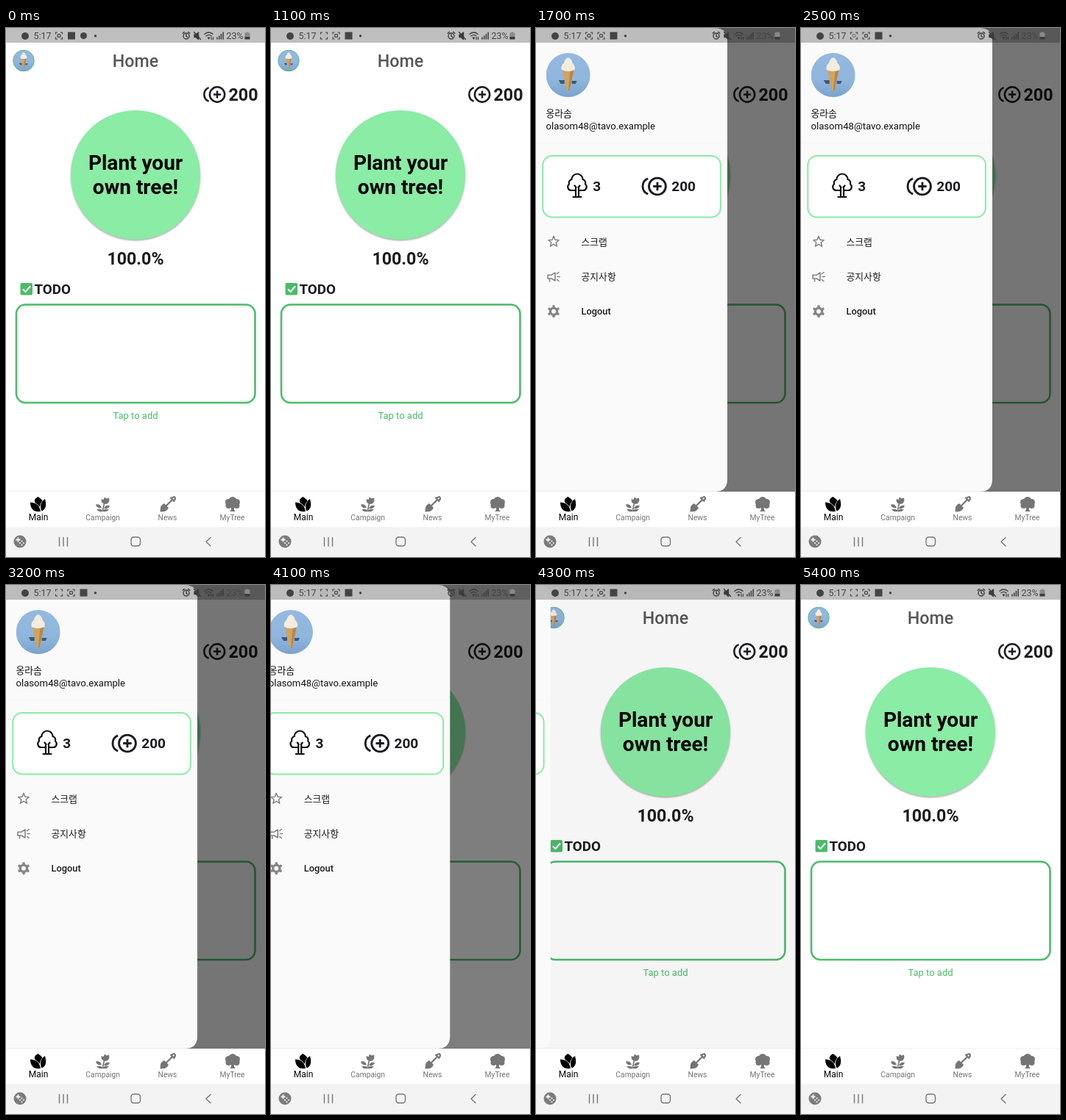
An HTML page that plays this animation: 352x720 px, repeating every 5500 ms.

```html
<!DOCTYPE html>
<html lang="en">
<head>
<meta charset="utf-8">
<title>Plant your own tree</title>
<style>
  html, body { margin: 0; width: 100%; height: 100%; overflow: hidden; background: #fff; }
  svg { display: block; width: 352px; height: 720px; }
  text { font-family: Roboto, "Noto Sans CJK KR", "Noto Sans CJK", sans-serif; }
  .mid { text-anchor: middle; }
  .bold { font-weight: 700; fill: #1c1b1f; }
  .item { font-size: 12.84px; font-weight: 500; fill: #1c1b1f; }
  .tab { font-size: 10.3px; fill: #757575; text-anchor: middle; }
  .line { fill: none; stroke-linecap: round; stroke-linejoin: round; }
</style>
</head>
<body>
<svg viewBox="0 0 352 720">
  <defs>
    <clipPath id="round"><circle r="30"/></clipPath>
    <linearGradient id="sky" x2="0" y2="1">
      <stop stop-color="#94b9e2"/><stop offset=".6" stop-color="#8fb6dc"/><stop offset="1" stop-color="#7ba3cf"/>
    </linearGradient>
    <filter id="soft" x="-10%" y="-10%" width="120%" height="120%"><feGaussianBlur stdDeviation="1.3"/></filter>
    <g id="photo" clip-path="url(#round)">
      <rect x="-30" y="-30" width="60" height="60" fill="url(#sky)"/>
      <path d="M-13 7h8v5h-5zM5 8h7l-2 4h-5z" fill="#3d5878"/>
      <path d="M-8 -8H8L1.500 22H-1.500z" fill="#d3a35b"/>
      <path d="M3 -8H8L1.500 22H0z" fill="#b98643"/>
      <path d="M-9 -7Q-10 -14 -6 -16Q-4 -23 0 -24Q5 -22 6 -16Q10 -13 9 -7Q0 -3 -9 -7z" fill="#f3ecdf"/>
    </g>
    <!-- 24-unit coin, origin at the left middle -->
    <g id="coin" class="line" stroke="#1c1b1f" stroke-width="2" style="stroke-linecap:butt">
      <circle cx="15" r="8"/>
      <path d="M15 -4V4M11 0H19M6 -7.400A8 8 0 0 0 6 7.400"/>
    </g>
    <path id="corners" class="line" stroke="#444" stroke-width="1.200" style="stroke-linecap:butt"
      d="M-4.500 -2V-4.500H-2M2 -4.500H4.500V-2M4.500 2V4.500H2M-2 4.500H-4.500V2"/>
    <rect id="core" x="-1.900" y="-1.900" width="3.800" height="3.800" rx="1" fill="none" stroke="#444" stroke-width="1.200"/>
  </defs>

  <rect width="352" height="720" fill="#fff"/>

  <g id="home">
    <use href="#photo" transform="translate(24 44.500) scale(.48)"/>
    <circle cx="24" cy="44.500" r="14.300" fill="none" stroke="#5fb98a" stroke-width="1"/>
    <text class="mid" x="176" y="53" font-size="23.200" font-weight="500" fill="#565656">Home</text>
    <use href="#coin" transform="translate(268 90.500) scale(1.270)"/>
    <text class="bold" x="302.500" y="99" font-size="23.300">200</text>
    <circle cx="176" cy="201.500" r="88" fill="#000" opacity=".32" filter="url(#soft)"/>
    <circle cx="176" cy="200" r="88" fill="#8aeca5"/>
    <g class="mid" font-size="28" font-weight="700" fill="#000">
      <text x="176" y="193">Plant your</text>
      <text x="176" y="226">own tree!</text>
    </g>
    <text class="bold mid" x="176" y="322.300" font-size="23.200">100.0%</text>
    <rect x="19.500" y="347" width="16.500" height="16.500" rx="2" fill="#4cbb6b"/>
    <path d="M23 355.500L26.500 359L33 351.500" fill="none" stroke="#fff" stroke-width="2"/>
    <text class="bold" x="38.500" y="361.800" font-size="18.800">TODO</text>
    <rect x="14" y="376.500" width="324.500" height="133.500" rx="12.500" fill="none" stroke="#4cbb6b" stroke-width="2.600"/>
    <text class="mid" x="176" y="531.700" font-size="13" fill="#4cbb6b">Tap to add</text>
  </g>

  <rect id="scrim" width="352" height="631" opacity="0"/>

  <g id="drawer" transform="translate(-262 0)">
    <path d="M0 0H243Q260 0 260 17V614Q260 631 243 631H0z" fill="#fafafa"/>
    <use href="#photo" transform="translate(43.700 64)"/>
    <text x="13.500" y="121.300" font-size="12.840" fill="#111">옹라솜</text>
    <text x="13.500" y="137.500" font-size="13.150" fill="#111">olasom48@tavo.example</text>
    <path d="M0 156.500H260" stroke="#f3f3f3"/>
    <rect x="9.300" y="174" width="241.500" height="83.500" rx="12.500" fill="#fff" stroke="#8aeca5" stroke-width="2"/>
    <g class="line" stroke="#111" stroke-width="2.200">
      <path d="M53 221H48A4.800 4.800 0 0 1 45 212.500A5 5 0 0 1 48.500 206A7.500 7.500 0 0 1 63.500 206A5 5 0 0 1 67 212.500A4.800 4.800 0 0 1 64 221H59"/>
      <path d="M54 218V229.500M58 218V229.500M50.500 230H61.500M52.500 214.500L54.500 217M59.500 214.500L57.500 217"/>
    </g>
    <text class="bold" x="77.300" y="222" font-size="19">3</text>
    <use href="#coin" transform="translate(143.500 215.500) scale(1.430)"/>
    <text class="bold" x="184.300" y="222" font-size="19">200</text>
    <path id="star" class="line" stroke="#858585" stroke-width="1.500"/>
    <text class="item" x="61.500" y="295.800">스크랩</text>
    <g class="line" stroke="#858585" stroke-width="1.600">
      <path d="M16 336.200H21L26 333V344L21 341H16zM18.500 341V345M29 338.500H32.300M28.500 334.500L31 332.500M28.500 342.500L31 344.500"/>
    </g>
    <text class="item" x="61.500" y="343.300">공지사항</text>
    <path id="gear" fill="#858585" fill-rule="evenodd"/>
    <text class="item" x="61.500" y="390">Logout</text>
  </g>

  <g id="status">
    <rect width="352" height="20" opacity=".25"/>
    <circle cx="26" cy="11" r="5" fill="#444"/>
    <g font-size="12.500" fill="#444">
      <text x="37.500" y="15.200">5:17</text>
      <text x="299.500" y="15.200">23%</text>
    </g>
    <g id="fresh" transform="translate(72 10.500)"><use href="#corners"/><use href="#core" id="pulse"/></g>
    <g id="row">
      <g transform="translate(72 10.500)"><use href="#corners"/><use href="#core"/></g>
      <rect x="84" y="5.500" width="10" height="10" fill="#444"/>
      <circle id="last" cx="105.500" cy="10.500" r="4.500" fill="#444"/>
    </g>
    <circle cx="121.500" cy="10.700" r="1.700" fill="#444"/>
    <g class="line" stroke="#3c3c3c" stroke-width="1.400">
      <circle cx="245" cy="11" r="4"/>
      <path d="M245 8.800V11.300L246.700 12.300M240.200 7.200L242.300 5.400M249.800 7.200L247.700 5.400"/>
      <path d="M256 9H258L261.500 6V15.500L258 12.500H256z" fill="#3c3c3c"/>
      <path d="M255.500 5.500L264.500 15.500"/>
      <path d="M270 8.200Q275.500 3.800 281 8.200M272 10.800Q275.500 8 279 10.800"/>
      <path d="M274.300 13H276.700L275.500 14.800zM279 12.500V15.500M281.500 12.500V15.500" stroke-width="1.200"/>
      <path d="M287 13V15M289.700 11V15M292.400 8.500V15M295.100 6V15" stroke-width="1.500"/>
    </g>
    <path d="M326.500 5.500H329.500V6.500H331.500V12H324.500V6.500H326.500z" fill="#8a8a8a"/>
    <path d="M324.500 12H331.500V15.500H324.500z" fill="#3c3c3c"/>
  </g>

  <g id="tabs">
    <rect y="631" width="352" height="49" fill="#fff"/>
    <rect y="630" width="352" height="1" fill="#000" opacity=".06"/>
    <path d="M33 645.500C33 655 38 659 47 658C46 651 42 646 33 645.500zM53 641C55.500 650 54 655 48.500 657.500C45.500 651 47 645 53 641zM43.500 638C38 641 38 644 40 646.500C43 648 45 650.500 46 652C46 648 47.500 646 49.500 643.500C48 641 46 639.500 43.500 638z"/>
    <g fill="#757575">
      <path d="M129.500 641L132.500 642L134 638.500L136.500 640.500L140 639.500Q141.500 645 137.500 647.500Q133 649 130 645.500z"/>
      <path d="M122 648.500Q128 647 130 653Q123.500 654.500 122 648.500zM141 650Q135 648.500 133 654Q139 655.500 141 650zM123 655.500Q128 653.500 131.500 656.500Q135 653.500 140 655.500Q137 659 131.500 658Q126 659 123 655.500z"/>
      <path d="M133.500 647L131.500 656" stroke="#757575" stroke-width="1.600"/>
      <path d="M209.500 658.500L210 652Q211.500 648.500 215 647L221 653Q219.500 656.500 216 658z"/>
      <path d="M217 651L226 642M224 639.500L228.500 644M224.500 640Q229 637 229.500 639Q231 641 228 643.500" class="line" stroke="#757575" stroke-width="2.200"/>
      <circle cx="308" cy="643.500" r="5.500"/><circle cx="302.500" cy="645.500" r="4.500"/><circle cx="313.500" cy="645.500" r="4.500"/>
      <circle cx="302.500" cy="650" r="4"/><circle cx="313.500" cy="650" r="4"/>
      <path d="M303 647H313V653H310V656L312 658H304L306 656V653H303z"/>
    </g>
    <text class="tab" x="44" y="669.500" style="font-size:12px;fill:#000">Main</text>
    <text class="tab" x="131.700" y="669.700">Campaign</text>
    <text class="tab" x="219.500" y="669.700">News</text>
    <text class="tab" x="307.500" y="669.700">MyTree</text>
  </g>

  <g id="keys">
    <rect y="679" width="352" height="41" fill="#f3f3f3"/>
    <circle cx="19" cy="699" r="8.500" fill="#7b7b7b"/>
    <path d="M16.500 693.500V699.500M13.500 696.500H19.500" stroke="#f3f3f3" stroke-width="1.800"/>
    <g fill="#f3f3f3">
      <circle cx="21.500" cy="698.500" r="1.100"/><circle cx="24" cy="701" r="1.100"/>
      <circle cx="19" cy="701" r="1.100"/><circle cx="21.500" cy="703.500" r="1.100"/>
    </g>
    <g class="line" stroke="#777" stroke-width="1.400">
      <path d="M72.500 693.500V705M78 693.500V705M83.500 693.500V705"/>
      <rect x="170" y="693" width="12.500" height="12" rx="3.500"/>
      <path d="M278 693.500L272 699.200L278 705"/>
    </g>
  </g>
</svg>
<script>
  const LOOP = 5500, STEP = 100, WIDTH = 260;
  const $ = id => document.getElementById(id);
  const clamp = v => Math.min(1, Math.max(0, v));
  const smooth = v => { v = clamp(v); return v * v * (3 - 2 * v); };

  // Closed outline through n points in polar form
  function polar(cx, cy, n, radius, angle) {
    let d = "";
    for (let i = 0; i < n; i++) {
      const r = radius(i), a = angle(i);
      d += (i ? "L" : "M") + (cx + r * Math.cos(a)).toFixed(2) + " " + (cy + r * Math.sin(a)).toFixed(2);
    }
    return d + "z";
  }

  $("star").setAttribute("d", polar(24, 291, 10, i => i % 2 ? 3.4 : 7.6, i => i * Math.PI / 5 - Math.PI / 2));

  const teeth = polar(24, 385.7, 24, i => i % 4 < 2 ? 8.5 : 6.3,
    i => (Math.floor(i / 4) + [-0.17, 0.17, 0.27, 0.73][i % 4]) * Math.PI / 3 - Math.PI / 2);
  const hole = polar(24, 385.7, 20, () => 3, i => i * Math.PI / 10);
  $("gear").setAttribute("d", teeth + hole);

  // Critically damped spring that snaps near its end
  function spring(ms, rate) {
    const a = Math.max(0, ms) * rate;
    const v = 1 - (1 + a) * Math.exp(-a);
    return v > 0.98 ? 1 : v;
  }

  const openness = t => t < 3000 ? spring(t - 1110, 0.0224) : 1 - spring(t - 4078.5, 0.0191);

  function blink(t) {
    const p = (t + 650) % 1000;
    return p < 500 ? smooth(p / 300) : 1 - smooth((p - 500) / 300);
  }

  function draw(now) {
    const t = Math.floor((now % LOOP) / STEP) * STEP;
    const open = openness(t);
    const x = open > 0 ? (open - 1) * WIDTH : -WIDTH - 2;
    $("drawer").setAttribute("transform", `translate(${x.toFixed(2)} 0)`);
    $("scrim").setAttribute("opacity", (0.54 * open).toFixed(4));

    const push = smooth(t / 400);
    $("row").setAttribute("transform", `translate(${(16.5 * push).toFixed(2)} 0)`);
    $("last").setAttribute("opacity", 1 - push);
    $("fresh").setAttribute("opacity", push);
    $("pulse").setAttribute("opacity", blink(t).toFixed(3));
  }

  let start = null;
  function tick(now) {
    if (start === null) start = now;
    draw(now - start);
    requestAnimationFrame(tick);
  }
  draw(0);
  requestAnimationFrame(tick);
</script>
</body>
</html>
```
